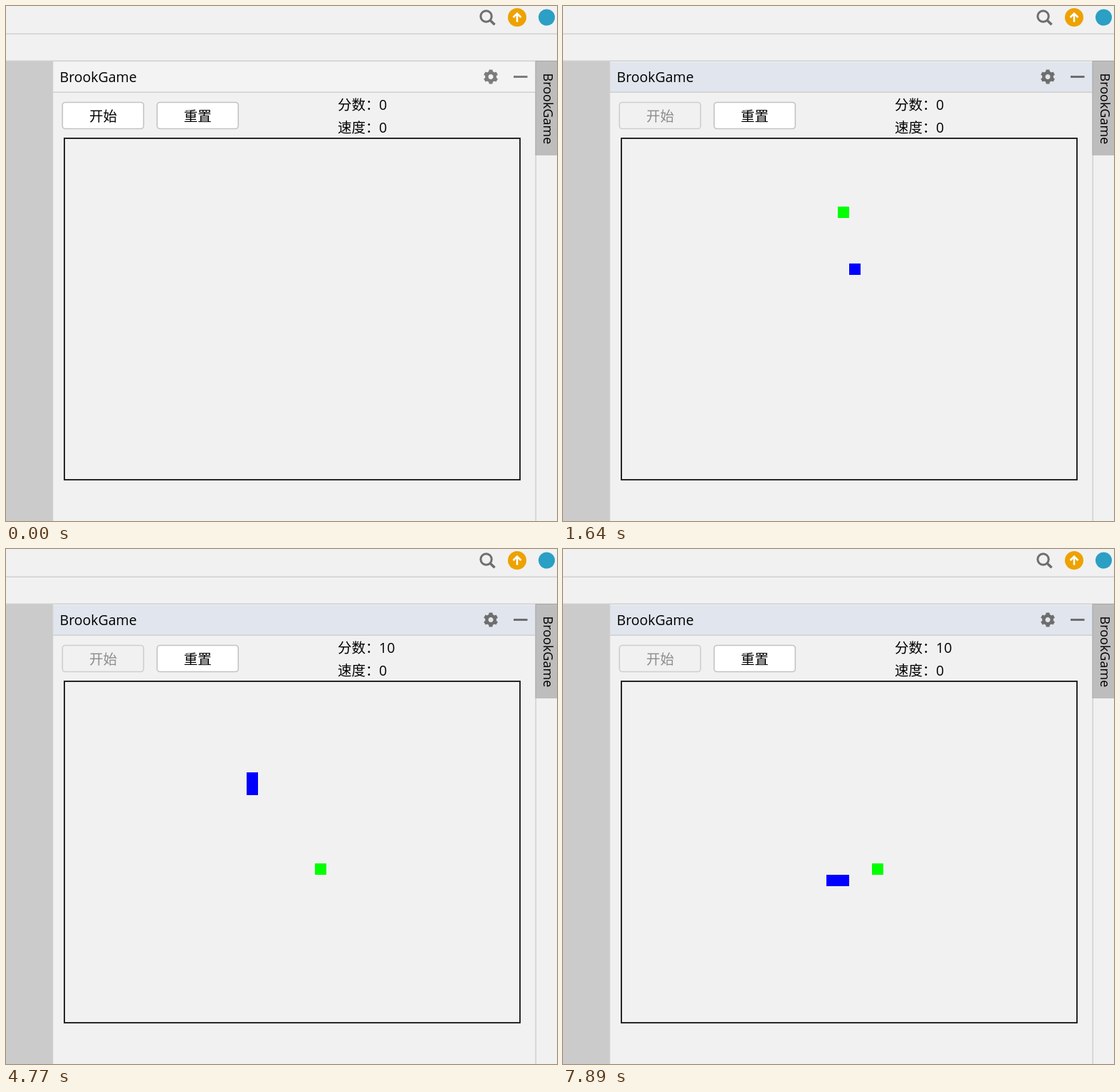
An HTML page that plays this animation: 774x724 px, repeating every 8 s.

```html
<!DOCTYPE html>
<html lang="zh-CN">
<head>
<meta charset="utf-8">
<title>BrookGame</title>
<style>
  html, body { margin: 0; width: 100%; height: 100%; overflow: hidden; background: #f1f1f1; }
  svg { display: block; width: 774px; height: 724px; }
  text { font: 19.5px "Open Sans", "Noto Sans CJK SC", "Noto Sans CJK", sans-serif; fill: #000; }
  .mid { text-anchor: middle; }
  .cell { width: 16px; height: 16px; }
  .line { fill: #d0d0d0; }
  .button { fill: #fff; stroke: #c3c3c3; stroke-width: 1.6; }
  .tools { color: #7c7c7c; }
  #header { fill: #f3f3f3; }
  .active #header { fill: #e1e5ed; }
  .active .tools { color: #6e6e6e; }
  .running #start .button { fill: #f1f1f1; stroke: #cecece; }
  .running #start text { fill: #8c8c8c; }
</style>
</head>
<body>
<svg id="stage" viewBox="0 0 774 724">
  <defs><path id="tooth" d="M-2.4-10h4.8l.6 4h-6z" fill="currentColor"/></defs>
  <rect width="774" height="724" fill="#f1f1f1"/>
  <rect y="78" width="65" height="646" fill="#cbcbcb"/>
  <rect id="header" x="66" y="79" width="678" height="42"/>
  <g class="line">
    <rect y="38.5" width="774" height="1.5"/>
    <rect y="76.5" width="774" height="1.5"/>
    <rect x="65" y="78" width="1.3" height="646"/>
    <rect x="66" y="120.5" width="678" height="1.5"/>
    <rect x="743.5" y="78" width="1.5" height="646"/>
  </g>
  <rect x="744" y="78" width="30" height="132" fill="#bdbdbd"/>
  <path d="M774 77.5H744V210" fill="none" stroke="#a9a9a9"/>

  <g fill="none" stroke="#6e6e6e" stroke-width="3">
    <circle cx="674.5" cy="14.5" r="7.7"/>
    <path d="M680 20l6.5 6.2" stroke-width="3.6"/>
  </g>
  <circle cx="718" cy="16" r="13" fill="#eda200"/>
  <path d="M718 22.5V11M712.5 16l5.5-5.5 5.5 5.5" fill="none" stroke="#fff" stroke-width="2.6"/>
  <circle cx="759.5" cy="16" r="11.5" fill="#2b9fc4"/>

  <text x="75.5" y="107">BrookGame</text>
  <text transform="translate(754.5 94.5) rotate(90)" style="font-size:18px">BrookGame</text>
  <g class="tools">
    <g transform="translate(681 99.5)">
      <circle r="5.7" fill="none" stroke="currentColor" stroke-width="4.4"/>
      <use href="#tooth"/>
      <use href="#tooth" transform="rotate(60)"/>
      <use href="#tooth" transform="rotate(120)"/>
      <use href="#tooth" transform="rotate(180)"/>
      <use href="#tooth" transform="rotate(240)"/>
      <use href="#tooth" transform="rotate(300)"/>
    </g>
    <rect x="713" y="98" width="19.5" height="3" fill="currentColor"/>
  </g>

  <g id="start">
    <rect class="button" x="79.3" y="135.5" width="114" height="37" rx="4"/>
    <text class="mid" x="136.5" y="162">开始</text>
  </g>
  <rect class="button" x="212.3" y="135.5" width="114" height="37" rx="4"/>
  <text class="mid" x="269.3" y="162">重置</text>
  <text x="466" y="146">分数：</text><text id="score" x="524" y="146">0</text>
  <text x="466" y="178">速度：</text><text x="524" y="178">0</text>

  <rect x="82" y="186" width="640" height="480" fill="none" stroke="#111" stroke-width="1.8"/>
  <g id="board" shape-rendering="crispEdges">
    <rect id="food" class="cell" fill="#0f0"/>
    <rect id="tail" class="cell" fill="#00f"/>
    <rect id="head" class="cell" fill="#00f"/>
  </g>
</svg>
<script>
  const LOOP = 8000, CELL = 16;
  const FOCUS = 690, PRESS = 760, SPAWN = 840, EAT = 3280, GROW = 3510;
  const $ = id => document.getElementById(id);

  // One turn per letter, at the matching time; a key press steps at once.
  const turns = 'U'.repeat(8) + 'L'.repeat(4) + 'D'.repeat(11) + 'R'.repeat(3);
  const times = [
    1020, 1320, 1640, 1960, 2260, 2580, 2910, 3210,
    EAT, GROW, 3830, 4150,
    4220, 4450, 4770, 5090, 5390, 5710, 6030, 6330, 6640, 6960, 7260,
    7360, 7590, 7890
  ];
  const dirs = { U: [0, -1], L: [-1, 0], D: [0, 1], R: [1, 0] };
  const path = [[20, 14]];
  for (const turn of turns) {
    const [x, y] = path[path.length - 1], [dx, dy] = dirs[turn];
    path.push([x + dx, y + dy]);
  }

  function place(id, [x, y]) {
    $(id).setAttribute('x', 82 + x * CELL);
    $(id).setAttribute('y', 186 + y * CELL);
  }

  function draw(t) {
    const step = times.filter(at => at <= t).length;
    const eaten = t >= EAT;
    $('stage').classList.toggle('active', t >= FOCUS);
    $('stage').classList.toggle('running', t >= PRESS);
    $('board').style.visibility = t >= SPAWN ? 'visible' : 'hidden';
    $('score').textContent = eaten ? '10' : '0';
    place('food', eaten ? [22, 16] : [19, 6]);
    place('head', path[step]);
    place('tail', path[t >= GROW ? step - 1 : step]);
  }

  const begin = performance.now();
  function tick() {
    draw((performance.now() - begin) % LOOP);
    requestAnimationFrame(tick);
  }
  tick();
</script>
</body>
</html>
```
